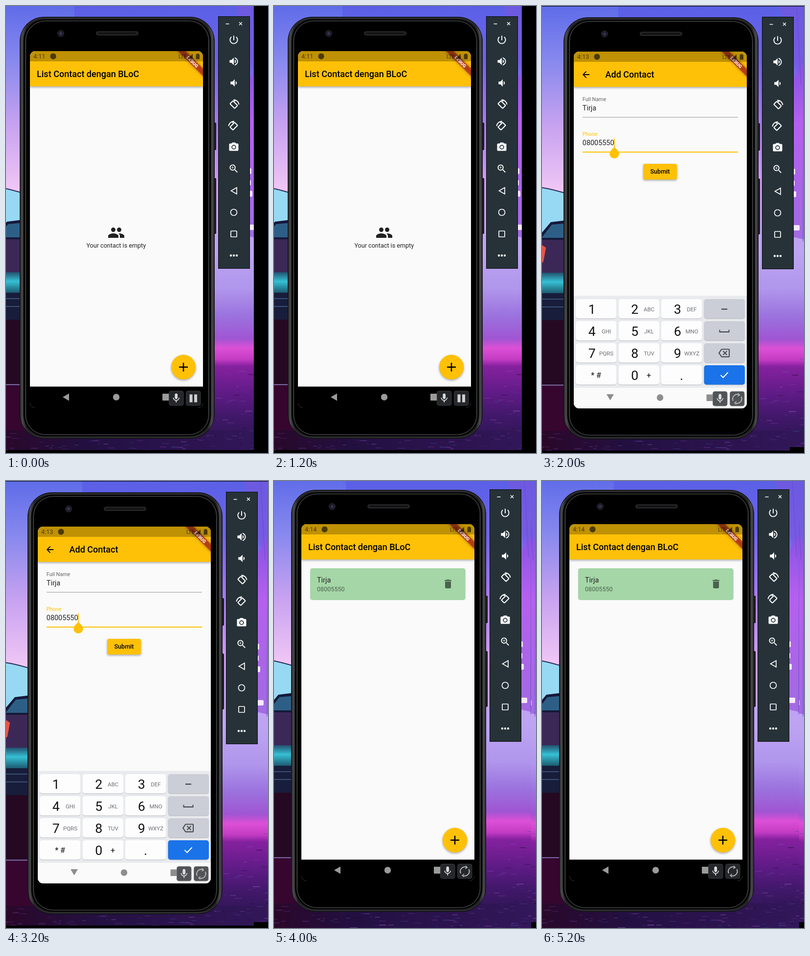
An HTML page that plays this animation: 536 by 912 pixels, repeating every 6000 ms.

```html
<!DOCTYPE html>
<html lang="id">
<head>
<meta charset="utf-8">
<title>Contact list demo</title>
<style>
html, body { margin: 0; width: 100%; height: 100%; overflow: hidden; background: #000; }
svg { display: block; width: 536px; height: 912px; }
text { font-family: Roboto, sans-serif; white-space: pre; }
.world { animation: jump 6s step-end infinite; }
.s0, .s1, .s2 { animation: show 6s step-end infinite; }
.s1 { animation-delay: -4s; }
.s2 { animation-delay: -2s; }
@keyframes show { 0% { visibility: visible; } 33.3333%, 100% { visibility: hidden; } }
@keyframes jump {
  0% { transform: translate(0, 0); }
  33.3333% { transform: translate(16px, 1px); }
  66.6666% { transform: translate(7px, -4px); }
}
.title { font-size: 18.03px; font-weight: 500; }
.body { font-size: 12.6px; }
.input { font-size: 14.4px; fill: #212121; }
.label { font-size: 10.8px; }
.mid { text-anchor: middle; }
.soft { filter: drop-shadow(0 2px 2px #0005); }
.line { fill: none; stroke: #fff; stroke-width: 2; }
</style>
</head>
<body>
<svg viewBox="0 0 536 912">
<defs>
  <linearGradient id="skyL" x2="0" y2="1">
    <stop stop-color="#5f6ce8"/><stop offset=".25" stop-color="#8788ee"/>
    <stop offset=".55" stop-color="#c7a2f0"/><stop offset=".85" stop-color="#efc6f5"/><stop offset="1" stop-color="#f4cdf2"/>
  </linearGradient>
  <linearGradient id="skyR" x2="0" y2="1">
    <stop stop-color="#5a60e6"/><stop offset=".12" stop-color="#6f63ea"/><stop offset=".24" stop-color="#a177f0"/>
    <stop offset=".38" stop-color="#cc98f4"/><stop offset=".54" stop-color="#bda4f2"/><stop offset=".62" stop-color="#b096ec"/>
    <stop offset=".68" stop-color="#9b72de"/><stop offset=".73" stop-color="#a055d2"/><stop offset=".75" stop-color="#dc50d6"/>
    <stop offset=".775" stop-color="#c43cc4"/><stop offset=".79" stop-color="#86219f"/><stop offset=".85" stop-color="#5f1b86"/>
    <stop offset=".9" stop-color="#41186a"/><stop offset=".96" stop-color="#2b1550"/><stop offset="1" stop-color="#2c1650"/>
  </linearGradient>
  <linearGradient id="tower" x2="0" y2="1">
    <stop stop-color="#7a4fe0"/><stop offset=".4" stop-color="#b560ee"/><stop offset="1" stop-color="#a26be2"/>
  </linearGradient>
  <linearGradient id="glow" x2="0" y2="1">
    <stop stop-color="#23506e"/><stop offset=".45" stop-color="#36c0d4"/><stop offset="1" stop-color="#1c5a70"/>
  </linearGradient>
  <linearGradient id="ground" x2="1" y2="0">
    <stop stop-color="#2a0728"/><stop offset=".3" stop-color="#231041"/><stop offset="1" stop-color="#35185e"/>
  </linearGradient>
  <linearGradient id="rim" x2="1" y2="0">
    <stop stop-color="#1a1a1b"/><stop offset=".012" stop-color="#48494b"/><stop offset=".035" stop-color="#1d1d1f"/>
    <stop offset=".965" stop-color="#1d1d1f"/><stop offset=".988" stop-color="#48494b"/><stop offset="1" stop-color="#1a1a1b"/>
  </linearGradient>
  <clipPath id="screen"><rect x="49" y="92" width="354" height="728" rx="11"/></clipPath>
  <clipPath id="edge"><rect x="526" width="10" height="900"/></clipPath>

  <g id="wall">
    <rect x="-20" width="600" height="930" fill="url(#skyR)"/>
    <rect x="-20" width="160" height="440" fill="url(#skyL)"/>
    <path d="M470 0L520 190V0Z" fill="#7f55dc" opacity=".5"/>
    <path d="M497 150L540 80V480L497 470Z" fill="url(#tower)"/>
    <path d="M505 0L514 160M520 0L518 480" stroke="#6a48cc" stroke-width="1.5" opacity=".6"/>
    <g fill="#fbe6fd">
      <rect x="494" y="331" width="8" height="12" rx="2"/><rect x="494" y="355" width="7" height="11" rx="2"/>
      <rect x="496" y="377" width="8" height="12" rx="2"/><rect x="490" y="446" width="21" height="11" rx="2"/>
    </g>
    <path d="M-20 369Q10 373 60 390V470H-20Z" fill="#97d8f3"/>
    <path d="M-20 369Q10 373 60 390" fill="none" stroke="#252d58" stroke-width="2"/>
    <path d="M-20 466L2 440L60 433V780H-20Z" fill="#15183a"/>
    <path d="M-20 476L4 445L60 440V472H-20Z" fill="#2d5f86"/>
    <path d="M-20 476H60V546H-20Z" fill="#3b2856"/>
    <path d="M-20 484L-8 492L-13 520L-20 528Z" fill="#ea5446"/>
    <rect x="-20" y="543" width="80" height="42" fill="url(#glow)"/>
    <rect x="-20" y="585" width="80" height="55" fill="#171d3a"/>
    <path d="M-20 597H60M-20 613H60" stroke="#46608a" stroke-width="1.5"/>
    <rect x="-20" y="640" width="80" height="132" fill="#250922"/>
    <rect x="-20" y="772" width="80" height="100" fill="#36062f"/>
    <path d="M-20 772.5H60" stroke="#958ed0" stroke-width="1.5"/>
    <rect x="-20" y="866" width="600" height="64" fill="url(#ground)"/>
    <g id="specks" stroke-linecap="round"></g>
  </g>

  <g id="plus"><circle class="soft" cx="363" cy="736.7" r="25.2" fill="#ffc107"/><path d="M354 736.7H372M363 727.7V745.7" stroke="#000" stroke-width="2.5"/></g>
  <g id="bar">
    <rect class="soft" x="49" y="92" width="354" height="72" fill="#ffc107"/>
    <g transform="translate(403 92) rotate(45)">
      <rect x="-40" y="25.2" width="80" height="10.9" fill="#b71c1c" fill-opacity=".68" style="filter:drop-shadow(0 0 3px #0008)"/>
      <text class="mid" y="34" font-size="9.2" font-weight="900" fill="#fff">DEBUG</text>
    </g>
    <rect x="49" y="92" width="354" height="21" fill-opacity=".25"/>
    <g fill-opacity=".6">
      <circle cx="96.5" cy="102.7" r="6.2"/>
      <text x="353" y="107" font-size="10.6">LTE</text>
      <path d="M382 97.500V108H371.500Z"/>
      <path d="M388.500 98.500H390.500V97H394V98.500H396V108.500H388.500Z"/>
    </g>
  </g>
  <g id="navDark" fill="#9b9b9b">
    <rect x="49" y="776.500" width="354" height="44" fill="#000"/>
    <path d="M116 798L129 790.500V805.500Z"/><circle cx="225.500" cy="798" r="6.700"/><rect x="320" y="791" width="14" height="14" rx="1"/>
  </g>
  <g id="mic">
    <rect x="333.500" y="785.500" width="29.500" height="29.500" rx="4"/><rect x="368.500" y="785.500" width="29.500" height="29.500" rx="4"/>
    <path transform="translate(336.700 788.500) scale(.96)" fill="#dcdcdc" stroke="none" d="M12 14c1.660 0 3-1.340 3-3V5c0-1.660-1.340-3-3-3S9 3.340 9 5v6c0 1.660 1.340 3 3 3zm5.300-3c0 3-2.540 5.100-5.300 5.100S6.700 14 6.700 11H5c0 3.410 2.720 6.230 6 6.720V21h2v-3.280c3.280-.48 6-3.300 6-6.720z"/>
  </g>
  <g id="sync" fill="none" stroke="#b4b4b4" stroke-width="2">
    <path d="M375 804.500A9.300 9.300 0 0 1 387 792M391.500 796A9.300 9.300 0 0 1 379.500 808.800"/>
    <path d="M385 789L388.500 792.500L384.500 795M381.500 812L378 808.500L382 805.500" stroke-width="1.500"/>
  </g>
</defs>

<g class="world">
  <use href="#wall"/>

  <!-- phone body -->
  <path d="M28 674H29V832H28Z" fill="#555"/>
  <g fill="#222226" stroke="#0b0b0c"><rect x="424" y="238.500" width="5.500" height="55" rx="1.500"/><rect x="424" y="351.500" width="5.500" height="113" rx="1.500"/></g>
  <rect x="28.500" y="22.500" width="398" height="860" rx="49" fill="url(#rim)" stroke="#101011"/>
  <rect x="31" y="25" width="393" height="855" rx="46.500" fill="none" stroke="#55565a" stroke-opacity=".65"/>
  <rect x="36.500" y="28.500" width="382" height="848" rx="43" fill="#111" stroke="#000" stroke-width="2"/>
  <rect x="40.500" y="30.500" width="374" height="844" rx="40" fill="#000" stroke="#5c5d60"/>
  <rect x="184.500" y="52" width="86" height="7.500" rx="3.700" fill="#1f1f21" stroke="#313134"/>
  <path d="M189 55.800H266" stroke="#0c0c0d" stroke-width="2"/>
  <circle cx="112" cy="56" r="6.300" fill="#1b1b24" stroke="#303038"/><circle cx="112" cy="56" r="2.800" fill="#34345c"/>

  <!-- app screens -->
  <g clip-path="url(#screen)">
    <rect x="49" y="92" width="354" height="728" fill="#fafafa"/>
    <use href="#bar"/>
    <g class="s0">
      <text class="body" x="56" y="107" fill-opacity=".6">4:11</text>
      <text class="title" x="63" y="145.300">List Contact dengan BLoC</text>
      <path transform="translate(207.500 444.500) scale(1.500)" fill="#212121" d="M16 11c1.660 0 3-1.340 3-3S17.660 5 16 5s-3 1.340-3 3 1.340 3 3 3zm-8 0c1.660 0 3-1.340 3-3S9.660 5 8 5 5 6.340 5 8s1.340 3 3 3zm0 2c-2.330 0-7 1.170-7 3.500V19h14v-2.500c0-2.330-4.670-3.500-7-3.500zm8 0c-.290 0-.620.020-.970.050 1.160.840 1.970 1.970 1.970 3.450V19h6v-2.500c0-2.330-4.670-3.500-7-3.500z"/>
      <text class="body" x="164.400" y="493" fill="#212121">Your contact is empty</text>
      <use href="#plus"/><use href="#navDark"/>
    </g>
    <g class="s1">
      <text class="body" x="56" y="107" fill-opacity=".6">4:13</text>
      <path transform="translate(63.200 128.200) scale(.9)" d="M20 11H7.830l5.590-5.590L12 4l-8 8 8 8 1.410-1.410L7.830 13H20z"/>
      <text class="title" x="113.500" y="145.300">Add Contact</text>
      <text class="label" x="66.800" y="192.500" fill="#666">Full Name</text>
      <text class="input" x="66.800" y="211.500">Tirja</text>
      <path d="M67 226H385" stroke="#949494"/>
      <text class="label" x="66.800" y="264" fill="#ffc107">Phone</text>
      <text class="input" x="66.800" y="283">08005550</text>
      <path d="M67 297H385M132 269V289" stroke="#ffc107" stroke-width="1.800"/>
      <path d="M132 286.500L138.900 293.400A9.760 9.760 0 1 1 125.100 293.400Z" fill="#ffc107"/>
      <rect class="soft" x="191" y="321" width="69" height="32" rx="3.600" fill="#ffc107"/>
      <text class="body mid" x="225.500" y="341.400" font-weight="500">Submit</text>
      <rect x="49" y="590.500" width="354" height="188" fill="#e8eaee"/>
      <g id="keys"></g>
      <path d="M351 617.500H363" stroke="#202124" stroke-width="1.800"/>
      <path d="M347.500 659.500V664H366.500V659.500" fill="none" stroke="#3c4043" stroke-width="1.800"/>
      <path transform="translate(345 695.500) scale(.96)" fill="#3c4043" d="M22 3H7c-.690 0-1.230.350-1.590.880L0 12l5.410 8.110c.360.530.900.890 1.590.890h15c1.100 0 2-.900 2-2V5c0-1.100-.900-2-2-2zm0 16H7.070L2.400 12l4.660-7H22v14zm-11.590-2L14 13.410 17.590 17 19 15.590 15.410 12 19 8.410 17.590 7 14 10.590 10.410 7 9 8.410 12.590 12 9 15.590z"/>
      <path class="line" d="M349.500 752L354.500 757L364.500 746.500"/>
      <rect x="49" y="778" width="354" height="42" fill="#fafafa"/>
      <g fill="#8d8d8d"><path d="M116 791H131L123.500 803.500Z"/><circle cx="225.500" cy="798" r="6.700"/><rect x="320.500" y="791.500" width="14" height="13.500" rx="1"/></g>
    </g>
    <g class="s2">
      <text class="body" x="56" y="107" fill-opacity=".6">4:14</text>
      <text class="title" x="63" y="145.300">List Contact dengan BLoC</text>
      <rect x="66.800" y="182" width="318" height="65" rx="5" fill="#a5d6a7"/>
      <text class="input" x="81" y="210.800">Tirja</text>
      <text class="body" x="81" y="228.800" fill-opacity=".54">08005550</text>
      <path transform="translate(337 202)" fill-opacity=".54" d="M6 19c0 1.100.900 2 2 2h8c1.100 0 2-.900 2-2V7H6zM19 4h-3.500l-1-1h-5l-1 1H5v2h14z"/>
      <use href="#plus"/><use href="#navDark"/>
    </g>
  </g>

  <!-- recorder buttons -->
  <g class="s0"><use href="#mic" fill="#25272b" stroke="#393b40"/><path d="M378.500 792.500V808.500M388 792.500V808.500" stroke="#cfcfcf" stroke-width="6"/></g>
  <g class="s1"><use href="#mic" fill="#515356" stroke="#77797c"/><use href="#sync"/></g>
  <g class="s2"><use href="#mic" fill="#25272b" stroke="#393b40"/><use href="#sync"/></g>

  <!-- emulator toolbar -->
  <rect x="434.500" y="21.500" width="64" height="514" fill="#263238" stroke="#05080a"/>
  <path d="M449.500 36.500H456.500M477 33L483 39M483 33L477 39" stroke="#fff" stroke-width="1.400"/>
  <g id="tools" fill="#fff"></g>
  <g class="line" stroke-width="1.600">
    <g id="turn"><rect x="459.300" y="197" width="13.400" height="8.500" rx="1" transform="rotate(45 466 201.200)"/><path d="M465.500 191.300A11 11 0 0 1 476.500 201M465.500 191.300L469 194.500"/></g>
    <use href="#turn" transform="translate(932 44) scale(-1 1)"/>
    <path d="M472 370.500V383.500L460.500 377Z" stroke-width="1.700"/>
    <circle cx="466" cy="421" r="6.500" stroke-width="1.700"/>
    <rect x="460" y="459" width="12" height="12" rx="1" stroke-width="1.700"/>
  </g>
  <g fill="#fff"><circle cx="460" cy="509" r="2.200"/><circle cx="466" cy="509" r="2.200"/><circle cx="472" cy="509" r="2.200"/></g>
</g>

<!-- capture edges -->
<path class="s0" d="M507 0H536V912H0V906H507Z"/>
<path class="s1" d="M0 907H507V900H536V912H0Z"/>
<g class="s2"><g clip-path="url(#edge)"><use href="#wall" x="16" y="1"/></g><rect x="526" y="900" width="10" height="12"/></g>
</svg>

<script>
const NS = 'http://www.w3.org/2000/svg';
function add(parent, tag, attrs, text) {
  const el = document.createElementNS(NS, tag);
  for (const k in attrs) el.setAttribute(k, attrs[k]);
  if (text) el.textContent = text;
  return parent.appendChild(el);
}
const byId = id => document.getElementById(id);

const tools = {
  69: 'M13 3h-2v10h2zm4.830 2.170l-1.420 1.420C17.990 7.860 19 9.810 19 12c0 3.870-3.130 7-7 7s-7-3.130-7-7c0-2.190 1.010-4.140 2.580-5.420L6.170 5.170C4.230 6.820 3 9.260 3 12c0 4.970 4.030 9 9 9s9-4.030 9-9c0-2.740-1.230-5.180-3.170-6.830z',
  113: 'M3 9v6h4l5 5V4L7 9zm13.500 3c0-1.770-1.020-3.290-2.500-4.030v8.050c1.480-.730 2.500-2.250 2.500-4.020zM14 3.230v2.060c2.890.860 5 3.540 5 6.710s-2.110 5.850-5 6.710v2.060c4.010-.910 7-4.490 7-8.770s-2.990-7.860-7-8.770z',
  157: 'M18.500 12c0-1.770-1.020-3.290-2.500-4.030v8.050c1.480-.730 2.500-2.250 2.500-4.020zM5 9v6h4l5 5V4L9 9z',
  288: 'M9 2L7.170 4H4c-1.100 0-2 .900-2 2v12c0 1.100.900 2 2 2h16c1.100 0 2-.900 2-2V6c0-1.100-.900-2-2-2h-3.170L15 2zm3 15a5 5 0 1 1 0-10 5 5 0 0 1 0 10zm0-1.800a3.200 3.200 0 1 0 0-6.400 3.200 3.200 0 0 0 0 6.400z',
  332: 'M15.500 14h-.790l-.280-.270A6.500 6.500 0 1 0 13.730 14.430l.270.280v.790l5 4.990L20.490 19zm-6 0a4.500 4.500 0 1 1 0-9 4.500 4.500 0 0 1 0 9zm2.500-4h-2v2H9v-2H7V9h2V7h1v2h2z'
};
for (const y in tools)
  add(byId('tools'), 'path', { d: tools[y], transform: `translate(454.600 ${y - 11.4}) scale(.95)` });

const keys = ['1', '2 ABC', '3 DEF', '', '4 GHI', '5 JKL', '6 MNO', '', '7 PQRS', '8 TUV', '9 WXYZ', '', '*#', '0 +', '.', ''];
keys.forEach((key, i) => {
  const x = 53 + 87.5 * (i % 4), y = 597 + 45 * (i >> 2), g = byId('keys');
  const fill = i === 15 ? '#1a73e8' : i % 4 === 3 ? '#cbced6' : '#fdfdfe';
  add(g, 'rect', { x, y: y + 1, width: 83.5, height: 39.5, rx: 5, fill: '#b4b7bd' });
  add(g, 'rect', { x, y, width: 83.5, height: 39.5, rx: 5, fill });
  const put = (s, dx, dy, size, color) =>
    add(g, 'text', { class: 'mid', x: x + dx, y: y + dy, 'font-size': size, fill: color }, s);
  if (key === '*#') return put('* #', 41.5, 25.5, 16, '#111');
  const [main, sub] = key.split(' ');
  put(main, main === '.' ? 41.5 : 33.3, 30, 26.7, '#111');
  if (sub) sub === '+' ? put(sub, 62, 25.5, 16, '#111') : put(sub, 62.5, 24.8, 11.5, '#6a6d72');
});

// glints on the wet road
let seed = 7;
const rnd = () => (seed = seed * 16807 % 2147483647) / 2147483647;
const glints = ['#7a3aa8', '#58348c', '#120826', '#8a55b8', '#3d4690'];
for (let i = 0; i < 130; i++) {
  const low = i < 90, x = low ? rnd() * 540 - 20 : 427 + rnd() * 100, y = low ? 872 + rnd() * 44 : 705 + rnd() * 165;
  add(byId('specks'), 'path', { d: `M${x} ${y}h${3 + rnd() * 12}`, stroke: glints[i % 5], 'stroke-width': .8 + rnd(), opacity: .25 + rnd() * .4 });
}
</script>
</body>
</html>
```
